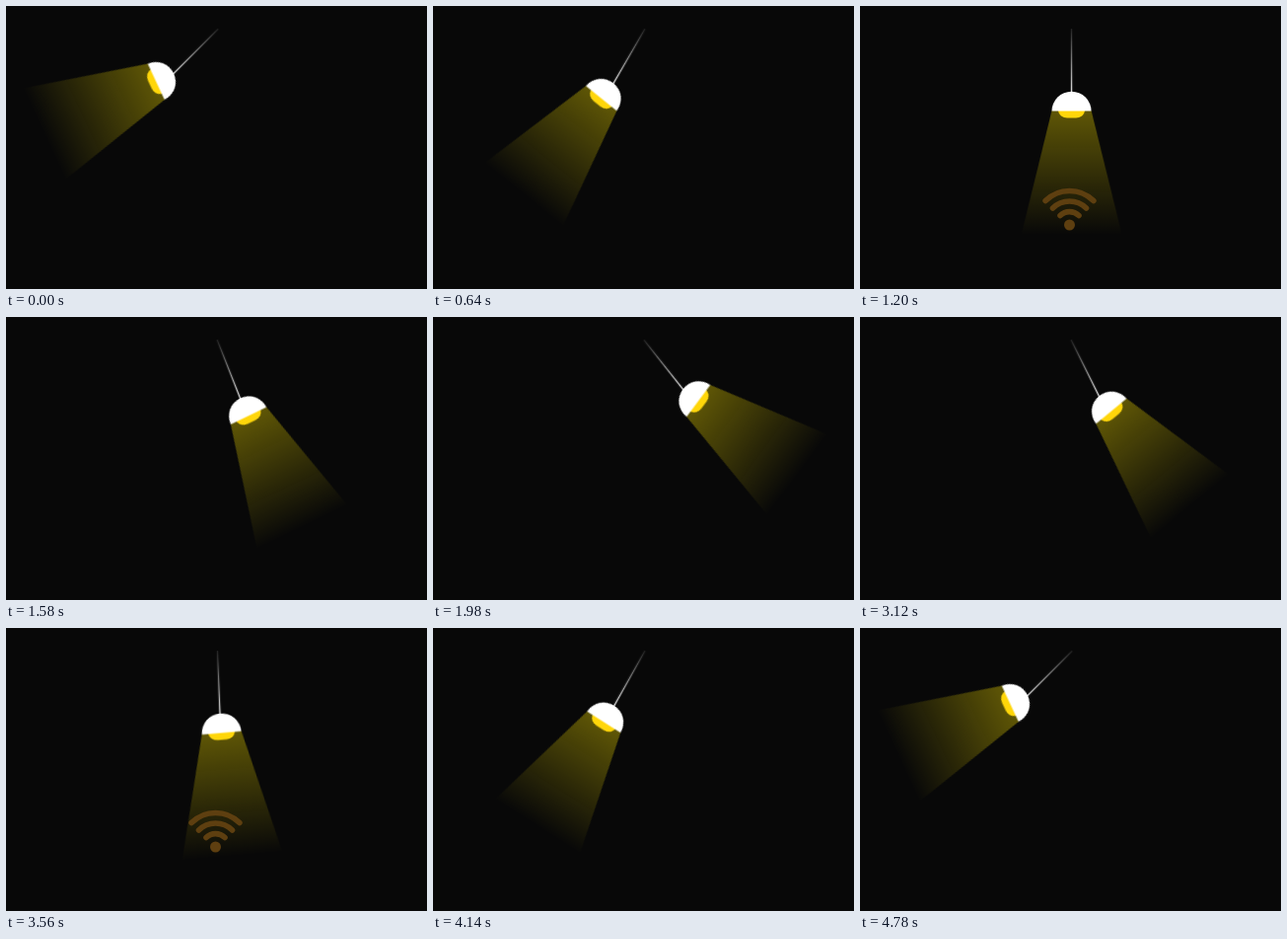
These frames come from a looping animation (427x287 px, 4.8 s). An HTML page:

```html
<!DOCTYPE html>
<html lang="en">
<head>
<meta charset="utf-8">
<title>Swinging lamp</title>
<style>
  html, body { margin: 0; width: 100%; height: 100%; overflow: hidden; background: #080808; }
  svg { display: block; width: 100%; height: 100%; }

  .arm {
    transform-origin: 214.5px 24px;
    animation: swing 4.8s cubic-bezier(.364, 0, .636, 1) infinite;
  }
  .lamp {
    transform-origin: 214.5px 87px;
    animation: tilt 4.8s ease-in-out infinite;
  }
  @keyframes swing {
    0%, 100% { transform: rotate(45deg); }
    50% { transform: rotate(-45deg); }
  }
  /* The shade trails the cord on the way back. */
  @keyframes tilt {
    0%, 100% { transform: rotate(20deg); }
    25% { transform: rotate(0deg); }
    50%, 54% { transform: rotate(-20deg); }
    81% { transform: rotate(0deg); }
  }
</style>
</head>
<body>
<svg viewBox="0 0 427 287">
  <defs>
    <linearGradient id="glow" x1="0" y1="0" x2="0" y2="1">
      <stop offset="0" stop-color="#ffe600" stop-opacity=".35"/>
      <stop offset="1" stop-color="#ffe600" stop-opacity="0"/>
    </linearGradient>
    <linearGradient id="fade" x1="0" y1="0" x2="0" y2="1">
      <stop offset="0" stop-color="#fff" stop-opacity=".1"/>
      <stop offset="1" stop-color="#fff" stop-opacity=".9"/>
    </linearGradient>
    <mask id="lit" maskUnits="userSpaceOnUse" x="0" y="0" width="427" height="287">
      <g class="arm"><g class="lamp">
        <path d="M194.5 106h40l31 126h-102z" fill="#fff"/>
      </g></g>
    </mask>
  </defs>

  <g class="arm">
    <rect x="213.8" y="23" width="1.4" height="65" fill="url(#fade)"/>
    <g class="lamp">
      <path d="M194.5 106h40l31 126h-102z" fill="url(#glow)"/>
      <path d="M201 105.5h27c0 5-5 8-9 8h-9c-4 0-9-3-9-8z" fill="#ffd60a"/>
      <path d="M194.5 106.5a20 19.7 0 0 1 40 0z" fill="#fff"/>
    </g>
  </g>

  <g mask="url(#lit)">
    <g transform="translate(212.5 222)" fill="none" stroke="#5e3f10" stroke-width="5.6" stroke-linecap="round">
      <circle r="5.5" fill="#5e3f10" stroke="none"/>
      <path d="M-9.5 -9.5A13.5 13.5 0 0 1 9.5 -9.5M-17 -17A24 24 0 0 1 17 -17M-24.4 -24.4A34.5 34.5 0 0 1 24.4 -24.4"/>
    </g>
  </g>
</svg>
</body>
</html>
```
